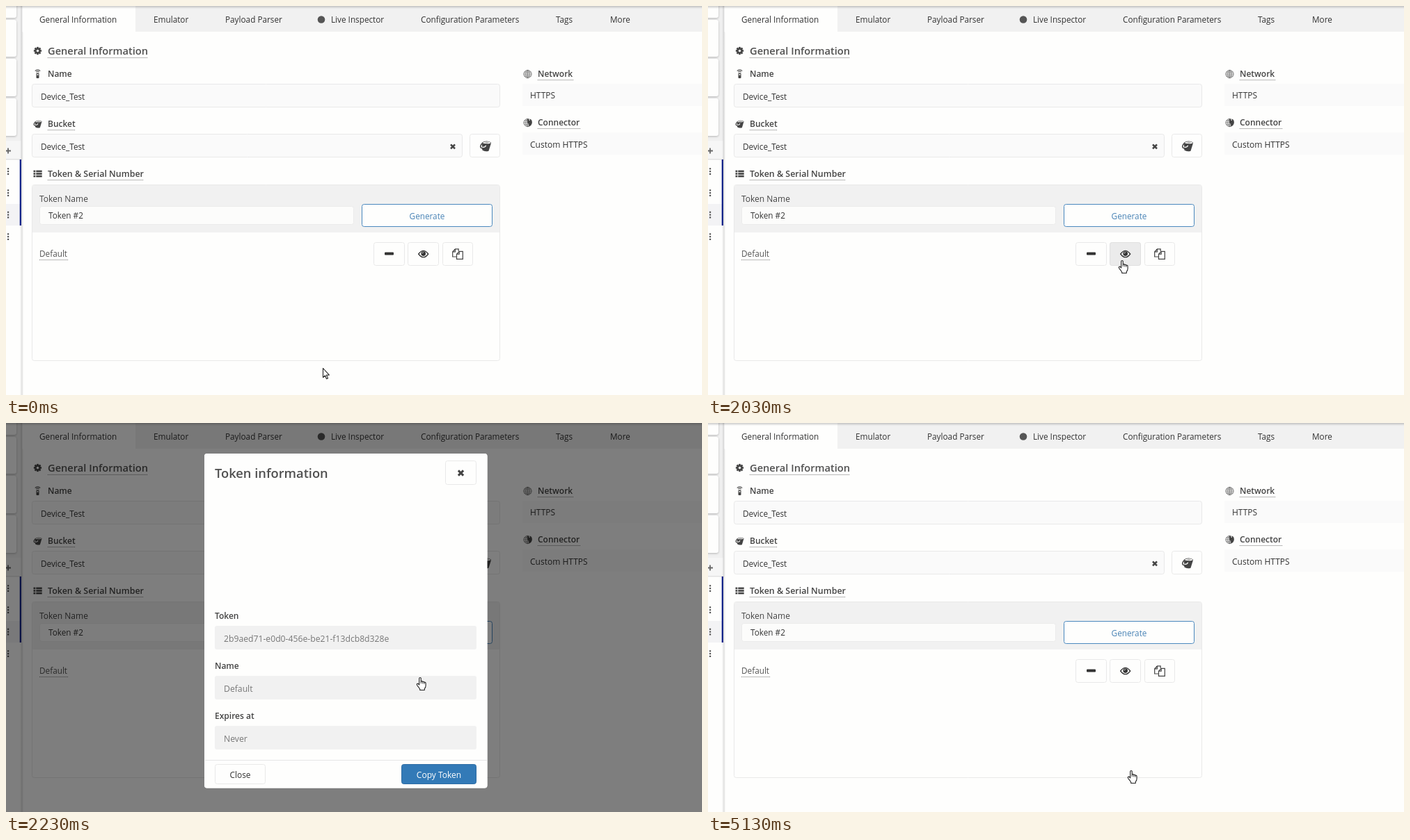
These frames come from a looping animation (1000x560 px, 5660 ms). An HTML page with a canvas:

```html
<!DOCTYPE html>
<html lang="en">
<head>
<meta charset="utf-8">
<title>Token information</title>
<style>
  html, body { margin: 0; width: 100%; height: 100%; overflow: hidden; background: #fefefd; }
  canvas { display: block; width: 100vw; height: 100vh; }
</style>
</head>
<body>
<canvas id="stage" width="1000" height="560"></canvas>
<script>
const W = 1000, H = 560, LOOP = 5660;
const INK = '#333', DARK = '#444', EDGE = '#e9e9e9', FIELD = '#fafafa', BLUE = '#337ab7', PAPER = '#fefefd';
const DIALOG = [285, 44, 406.5, 481.5];
const stage = document.getElementById('stage').getContext('2d');
let c = stage;

// ---- helpers ----
function layer(paint) {
  const el = document.createElement('canvas');
  el.width = W;
  el.height = H;
  const prev = c;
  c = el.getContext('2d');
  paint();
  c = prev;
  return el;
}

function at(x, y, scale, paint) {
  c.save();
  c.translate(x, y);
  c.scale(scale, scale);
  paint();
  c.restore();
}

function rect(x, y, w, h, fill) {
  c.fillStyle = fill;
  c.fillRect(x, y, w, h);
}

function box(x, y, w, h, fill, edge, r = 3) {
  const inset = edge ? .5 : 0;
  c.beginPath();
  c.roundRect(x + inset, y + inset, w - 2 * inset, h - 2 * inset, r);
  c.fillStyle = fill;
  c.fill();
  if (edge) { c.strokeStyle = edge; c.lineWidth = 1; c.stroke(); }
}

function text(str, x, y, size = 11.75, color = INK, weight = 400, align = 'left') {
  c.font = `${weight} ${size}px "Open Sans", "Noto Sans", sans-serif`;
  c.textAlign = align;
  c.fillStyle = color;
  c.fillText(str, x, y);
}

function label(str, x, y, size = 12, color = DARK) {
  text(str, x, y, size, color, 600);
}

function dots(x, y, w) {
  c.strokeStyle = '#777';
  c.lineWidth = 1;
  c.setLineDash([1, 1]);
  c.beginPath();
  c.moveTo(x, y + .5);
  c.lineTo(x + w, y + .5);
  c.stroke();
  c.setLineDash([]);
}

function disc(x, y, r, fill) {
  c.beginPath();
  c.arc(x, y, r, 0, 7);
  c.fillStyle = fill;
  c.fill();
}

function line(d, width, color = DARK) {
  c.strokeStyle = color;
  c.lineWidth = width;
  c.stroke(new Path2D(d));
}

function shape(d, fill = DARK) {
  c.fillStyle = fill;
  c.fill(new Path2D(d));
}

function shadow(color, blur, y = 0) {
  c.shadowColor = color;
  c.shadowBlur = blur;
  c.shadowOffsetY = y;
}

// ---- icons ----
function gear(x, y) {
  at(x, y, 1, () => {
    for (let i = 0; i < 8; i++) {
      rect(-1.3, -5.6, 2.6, 3, DARK);
      c.rotate(Math.PI / 4);
    }
    disc(0, 0, 4.2, DARK);
    disc(0, 0, 1.7, PAPER);
  });
}

function remote(x, y) {
  at(x, y, 1, () => {
    box(-2, -1.5, 4, 7.5, DARK, null, 1);
    rect(-1, 0, 2, 1.6, PAPER);
    line('M-2.2,-3 Q0,-4.6 2.2,-3 M-3.8,-4.6 Q0,-7.2 3.8,-4.6', 1.1);
  });
}

function bucket(x, y, scale) {
  at(x, y, scale, () => {
    c.rotate(.1);
    shape('M-4,-2.2 L5.6,-4 L3.8,4.8 Q0,6.4 -3,4.6 Z');
    shape('M-4.3,-3.4 Q0,-6.8 5.6,-4.6 Q5.4,-2.2 0,-1.8 Q-4.4,-1.8 -4.3,-3.4 Z');
    line('M-3,-3.2 Q1,-5.4 4.6,-4.1 Q1.6,-2.6 -3,-3.2', .8, PAPER);
    line('M-4,-2.6 Q-7,2 -3.4,2.6 Q0,2.6 1,-.2', 1.2);
    line('M-3.2,1.4 Q-.4,1.6 .4,-.8', 1, PAPER);
  });
}

function list(x, y) {
  for (let i = -1; i < 2; i++) {
    rect(x - 6, y + i * 3.6 - 1.3, 2.8, 2.6, DARK);
    rect(x - 2.2, y + i * 3.6 - 1.3, 8.4, 2.6, DARK);
  }
}

function globe(x, y) {
  at(x, y, 1, () => {
    c.strokeStyle = '#666';
    c.lineWidth = .8;
    for (const rx of [5.6, 2.6]) {
      c.beginPath();
      c.ellipse(0, 0, rx, 5.6, 0, 0, 7);
      c.stroke();
    }
    line('M-5.6,0 H5.6 M0,-5.6 V5.6 M-4.8,-2.8 H4.8 M-4.8,2.8 H4.8', .8, '#666');
  });
}

function plug(x, y) {
  globe(x - .5, y);
  at(x, y, 1, () => shape('M-1,-5 L1,-5 L1,-3 L3,-3 L3,-5.5 L5,-4 Q7,0 4,4 L1.5,5.5 L1,2 Q-2,0 -1,-5 Z'));
}

function cross(x, y, r, width) {
  line(`M${x - r},${y - r} L${x + r},${y + r} M${x + r},${y - r} L${x - r},${y + r}`, width);
}

function eye(x, y) {
  at(x, y, 1, () => {
    line('M-7,0 Q0,-9.4 7,0 Q0,9.4 -7,0 Z', 1.3, INK);
    disc(0, -.4, 3.3, INK);
    line('M-1.6,-.6 Q-1.4,-2.2 .2,-2.3', .8, PAPER);
  });
}

function pages(x, y) {
  at(x, y, 1, () => {
    line('M-1.5,4 H-7.3 V-3.2 L-3.6,-7.2 H1.2 V-4 M-3.6,-7.2 V-3.2 H-7.3', 1.2);
    line('M2.2,-3.6 H7.3 V7.3 H-1.5 V.2 Z M2.2,-3.6 V.2 H-1.5', 1.2);
  });
}

// ---- page ----
function sidebar() {
  rect(0, 0, 23, 222, '#f0f0f0');
  c.save();
  shadow('rgba(0,0,0,.25)', 3, 1);
  [[-8, 25], [20, 53], [76, 54], [133, 54]].forEach(([y, h]) => box(-8, y, 23, h, PAPER));
  c.restore();
  rect(0, 194, 22, 27, '#f6f6f6');
  rect(0, 220, 22, 1, '#e2e2e2');
  line('M-1,208.5 H7 M3,204.5 V212.5', 1.8, '#666');
  rect(0, 285, 20, 31, '#f3f3f5');
  for (const y of [238, 269, 300.5, 332])
    for (let i = -1; i < 2; i++) rect(2, y + i * 3.8 - 1, 2.2, 2.2, '#555');
  rect(19.7, 221, 2.3, 95, '#14278f');
  const g = c.createLinearGradient(20, 0, 25, 0);
  g.addColorStop(0, 'rgba(0,0,0,0)');
  g.addColorStop(.6, 'rgba(0,0,0,.12)');
  g.addColorStop(1, 'rgba(0,0,0,0)');
  rect(20, 0, 5, H, g);
}

function tabs() {
  rect(23, 0, W - 23, 37, '#f1f1f1');
  rect(24, 0, 162, 38, PAPER);
  const names = {
    48: 'General Information', 212: 'Emulator', 315: 'Payload Parser', 467: 'Live Inspector',
    596: 'Configuration Parameters', 790: 'Tags', 868: 'More'
  };
  for (const x in names) text(names[x], +x, 24);
  disc(453, 19.5, 5.3, '#555');
  const g = c.createLinearGradient(0, 0, 0, 4);
  g.addColorStop(0, 'rgba(0,0,0,.2)');
  g.addColorStop(1, 'rgba(0,0,0,0)');
  rect(0, 0, W, 4, g);
}

function form() {
  gear(45.5, 64.5);
  label('General Information', 60, 70, 14.65, '#505050');
  dots(60, 74, 144);

  remote(45.5, 98);
  label('Name', 60, 102);
  box(37, 112, 673, 34, FIELD, EDGE);
  text('Device_Test', 50, 135);

  bucket(45.5, 170, 1);
  label('Bucket', 60, 174);
  dots(60, 178, 40);
  box(37, 184, 619, 34, FIELD, EDGE);
  text('Device_Test', 50, 207);
  cross(642, 202.3, 3, 2.6);
  box(666, 184, 44, 34, PAPER, EDGE);
  bucket(689, 201.8, 1.35);

  list(45.5, 241.5);
  label('Token & Serial Number', 60, 246, 12.45);
  dots(60, 250, 138);
  box(37, 257, 673, 254, PAPER, EDGE);
  rect(38, 258, 671, 68, '#f1f1f1');
  text('Token Name', 48, 282, 12, DARK);
  box(48, 288, 452, 27, '#fcfcfb', '#ebebeb');
  text('Token #2', 61, 306);
  box(511, 285, 188, 33, PAPER, '#4a88be');
  text('Generate', 605, 307, 11.75, '#4a84b6', 400, 'center');

  text('Default', 48, 361, 11.75, '#555');
  dots(48, 365, 41);
  box(528, 340, 45, 34, PAPER, EDGE);
  box(544, 354.5, 13, 4, INK, null, 1);
  eyeButton(PAPER, EDGE);
  box(627, 340, 44, 34, PAPER, EDGE);
  pages(649, 357);

  globe(749.5, 98);
  label('Network', 764, 102);
  dots(764, 106, 51);
  rect(742, 112, 258, 32, FIELD);
  text('HTTPS', 753, 133, 12);
  plug(750, 168);
  label('Connector', 764, 172);
  dots(764, 176, 61);
  rect(742, 182, 258, 32, FIELD);
  text('Custom HTTPS', 753, 204, 12);
}

function eyeButton(fill, edge) {
  box(577, 340, 45, 34, fill, edge);
  eye(599.7, 357);
}

function tooltip() {
  c.save();
  shadow('rgba(0,0,0,.3)', 4, 1);
  box(577.5, 302.5, 91.5, 38, BLUE, null, 4);
  c.restore();
  shape('M597,340 H606 L601.5,344.5 Z', BLUE);
  text('Reveal token', 587.5, 326.5, 12, '#fff');
}

// ---- dialog ----
function copyButton(fill) {
  box(568, 491, 108, 29, fill, '#2e6da4');
  text('Copy Token', 622, 510.5, 12, '#fff', 400, 'center');
}

function dialog() {
  box(...DIALOG, PAPER, null, 4);
  label('Token information', 300, 79, 18.3, '#505050');
  box(631, 54, 45, 35, PAPER, EDGE);
  cross(653.5, 72, 3.6, 3);
  const rows = [['Token', '2b9aed71-e0d0-456e-be21-f13dcb8d328e'], ['Name', 'Default'], ['Expires at', 'Never']];
  rows.forEach(([name, value], i) => {
    const y = i * 72.2;
    label(name, 300, 281.5 + y);
    box(300, Math.round(292 + y), 376, 34, '#f1f1f1');
    text(value, 313, 315 + y, 12.2, '#777');
  });
  rect(286, 485, 405, 1, '#e6e6e6');
  box(300, 491, 73, 29, PAPER, EDGE);
  text('Close', 336.5, 510.5, 11.9, INK, 400, 'center');
  copyButton(BLUE);
}

// Dims everything around the dialog, not what lies behind it.
function backdrop(alpha) {
  c.beginPath();
  c.rect(0, 0, W, H);
  c.roundRect(...DIALOG, 4);
  c.fillStyle = `rgba(0,0,0,${alpha})`;
  c.fill('evenodd');
}

// ---- cursors, each placed by its hot spot ----
const cursors = {
  arrow: [0, 0, 'M.5,.5 V13.8 L3.4,11 L5.5,15.8 L7.5,14.9 L5.4,10.2 H9.3 Z'],
  hand: [-5.3, -.5, 'M4,1.8 Q4,.5 5.3,.5 Q6.6,.5 6.6,1.8 V6 Q8,5.2 9,6.4 Q10.4,5.8 11.2,7.2 Q13.4,6.8 13.4,9 V12 '
    + 'Q13.4,15 11.6,16.4 V18.5 H5 V17 Q3,14 1,11.6 Q0,9.8 1.3,9.2 Q2.6,8.8 4,11 Z'],
  beam: [0, 0, 'M-2.6,-6 H-.8 L0,-5.4 L.8,-6 H2.6 M0,-5.4 V5.4 M-2.6,6 H-.8 L0,5.4 L.8,6 H2.6']
};

function cursor(kind, x, y) {
  const [dx, dy, d] = cursors[kind];
  at(x + dx, y + dy, 1, () => {
    c.lineJoin = 'round';
    if (kind !== 'beam') shape(d, '#fff');
    line(d, 1.1, '#222');
    if (kind === 'hand') line('M6.6,6 V9 M9,6.6 V9.4 M11.2,7.4 V9.8', .9, '#222');
  });
}

// ---- timeline ----
const clamp = v => Math.min(1, Math.max(0, v));
const span = (t, a, b) => clamp((t - a) / (b - a));
const smooth = u => u * u * (3 - 2 * u);
const mix = (a, b, u) => a + (b - a) * u;

function pointer(t) {
  const rise = smooth(span(t, 115, 630));
  const fall = smooth(span(t, 3745, 4200));
  const x = mix(mix(455, 595, rise), 608, fall);
  const y = mix(mix(521, 366.5, rise), 500.5, fall);
  let kind = 'hand';
  if (t < 830) kind = 'arrow';
  else if (t >= 3700 && y < 491) kind = y < 399 || (y > 437 && y < 471) ? 'beam' : 'arrow';
  return { kind, x: kind === 'beam' ? x + 1 : x, y };
}

const page = layer(() => {
  rect(0, 0, W, H, PAPER);
  sidebar();
  tabs();
  form();
});
const modal = layer(dialog);

function render(t) {
  const p = pointer(t);
  stage.drawImage(page, 0, 0);

  if (t >= 830 && t < 2060) {
    stage.globalAlpha = span(t, 800, 1000);
    eyeButton(t < 2030 ? '#f1f1f1' : '#ebebeb', '#e0e0e0');
    if (t < 2030) tooltip();
    stage.globalAlpha = 1;
  }

  if (t >= 2030 && t < 5130) {
    const shown = 1 - (1 - span(t, 2040, 2220)) ** 2;
    backdrop(shown / 2);
    stage.globalAlpha = shown;
    stage.drawImage(modal, 0, 0);
    stage.globalAlpha = 1;
    if (t > 3700 && p.kind === 'hand') copyButton(t < 4900 ? '#3177b3' : '#3074ae');
  }

  cursor(p.kind, p.x, p.y);
}

const start = performance.now();
function tick() {
  render((performance.now() - start) % LOOP);
  requestAnimationFrame(tick);
}
tick();
</script>
</body>
</html>
```
